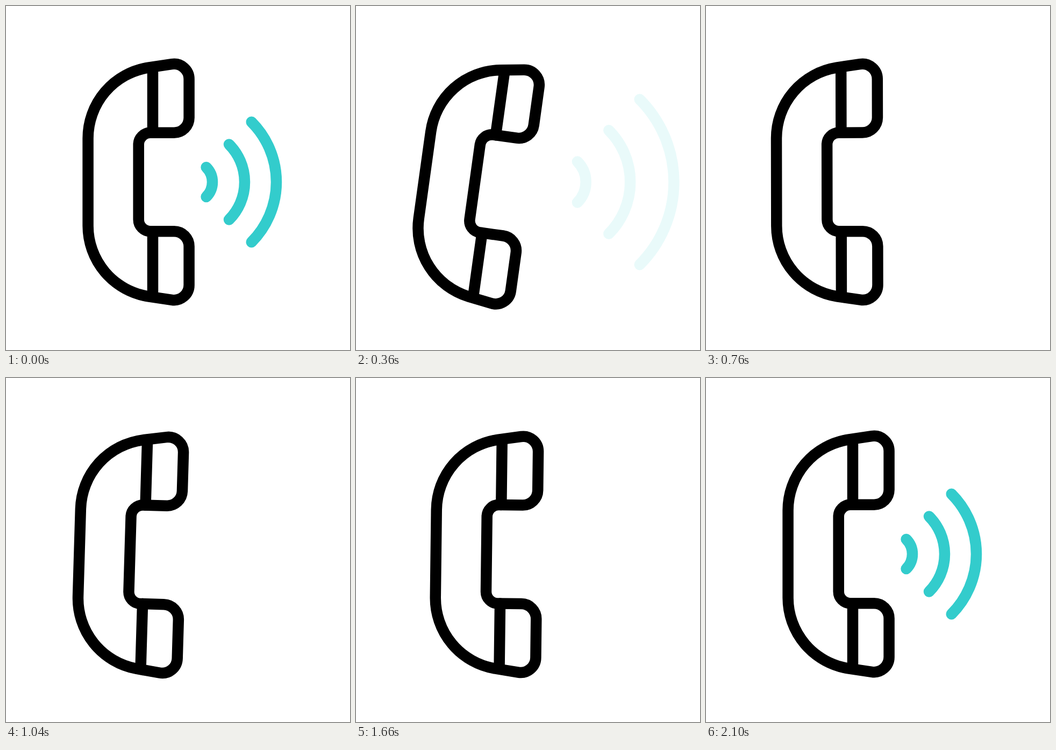
Write an HTML page that moves like this. It is 640 px wide and 640 px high and loops after 2.32 s.

```html
<!DOCTYPE html>
<html lang="en">
<head>
<meta charset="utf-8">
<title>Ringing handset</title>
<style>
  html, body { margin: 0; width: 100%; height: 100%; overflow: hidden; background: #fff; }
  svg { display: block; width: 100%; height: 100%; }
</style>
</head>
<body>
<svg viewBox="0 0 640 640" fill="none" stroke-width="20.5" stroke-linecap="round" stroke-linejoin="round">
  <g id="phone" stroke="#000">
    <path d="M152.6 246 A133 133 0 0 1 264.6 114.7 L308.3 108.2
      A28 28 0 0 1 340.6 136 V207.7 A28 28 0 0 1 312.6 235.7 H268.7
      A22 22 0 0 0 246.7 257.7 V397.3 A22 22 0 0 0 268.7 419.3 H312.6
      A28 28 0 0 1 340.6 447.3 V519 A28 28 0 0 1 308.3 546.8 L264.6 540.3
      A133 133 0 0 1 152.6 409 Z"/>
    <path d="M273 114 V235.7 M273 419.3 V540.6"/>
  </g>
  <path id="waves" stroke="#33cccc"/>
</svg>
<script>
  const LOOP = 2320, STEP = 20, MOVE_END = 2100, SWING = 300, FADE = 450;
  const CENTER = { x: 246.7, y: 327.5 };
  const ANGLES = [0, 10, -10, 8, -6, 4, -2, 0];
  const RADII = [39, 99, 158];
  const phone = document.getElementById('phone');
  const waves = document.getElementById('waves');

  const ease = (p) => {
    p = Math.min(1, Math.max(0, p));
    return p * p * (3 - 2 * p);
  };

  function angleAt(t) {
    const i = Math.min(ANGLES.length - 2, Math.floor(t / SWING));
    return ANGLES[i] + (ANGLES[i + 1] - ANGLES[i]) * ease(t / SWING - i);
  }

  function shiftAt(t) {
    return -25.6 * (ease(t / SWING) - ease((t - SWING) / (MOVE_END - SWING)));
  }

  // 45° arcs around a common centre that drifts right as they grow.
  function arcs(scale) {
    const cx = 268 + 77 * scale;
    return RADII.map((radius) => {
      const r = radius * scale, d = r * Math.SQRT1_2;
      return `M${cx + d} ${CENTER.y - d}A${r} ${r} 0 0 1 ${cx + d} ${CENTER.y + d}`;
    }).join('');
  }

  function draw(time) {
    const t = Math.min(MOVE_END, Math.floor((time % LOOP) / STEP) * STEP);
    phone.setAttribute('transform',
      `translate(${shiftAt(t)} 0) rotate(${angleAt(t)} ${CENTER.x} ${CENTER.y})`);

    const leave = ease(t / FADE);
    const enter = ease((t - MOVE_END + FADE) / FADE);
    const entering = t > MOVE_END / 2;
    waves.setAttribute('d', arcs(entering ? 0.58 + 0.42 * enter : 1 + 0.42 * leave));
    waves.setAttribute('opacity', entering ? enter : 1 - leave);
  }

  const start = performance.now();
  function frame() {
    draw(performance.now() - start);
    requestAnimationFrame(frame);
  }
  draw(0);
  requestAnimationFrame(frame);
</script>
</body>
</html>
```
